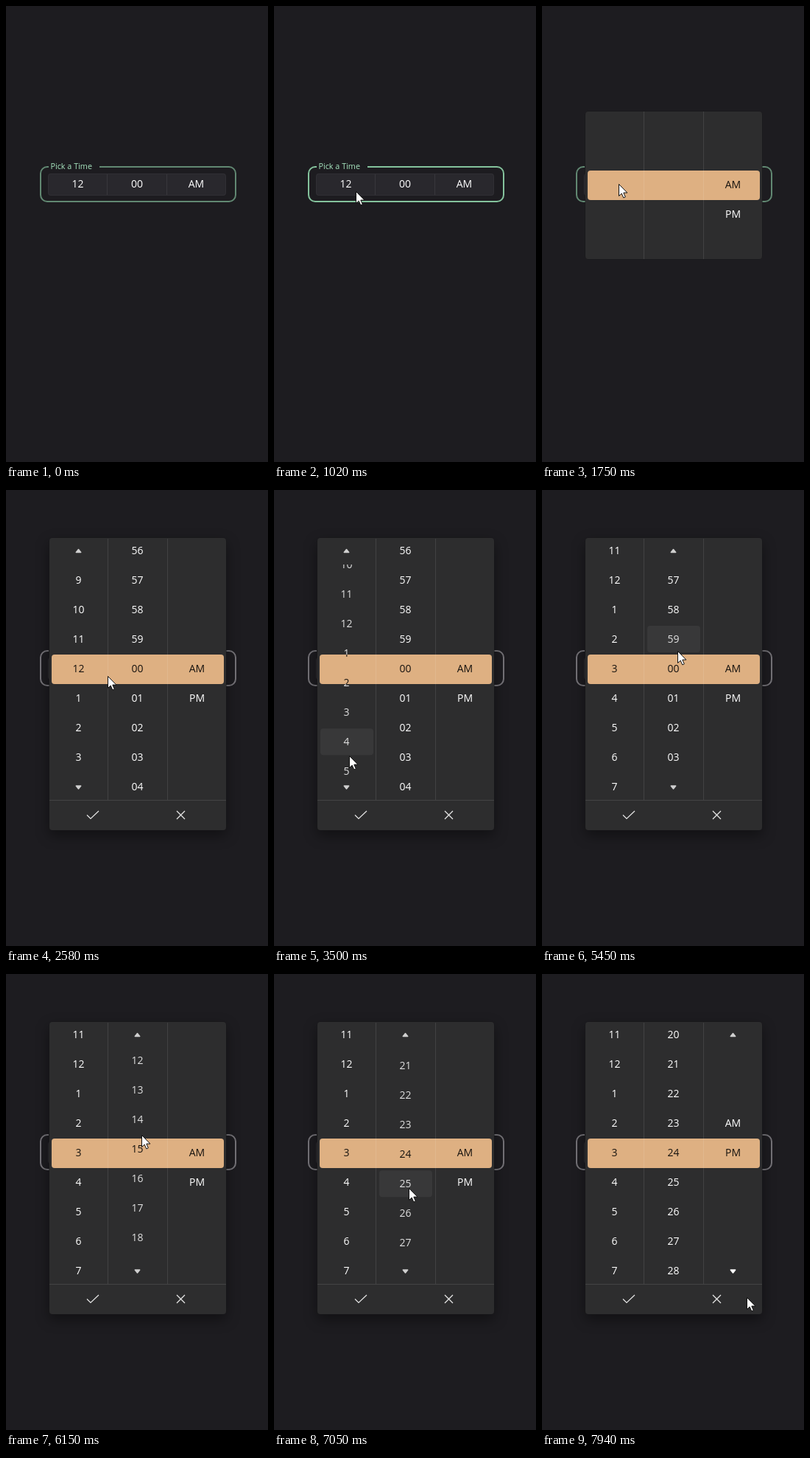
Animation, 356 px wide and 618 px high, one loop 8000 ms. Source, as an HTML page with a canvas:

```html
<!DOCTYPE html>
<html lang="en">
<head>
<meta charset="utf-8">
<title>Time picker</title>
<style>
html, body { margin: 0; width: 100%; height: 100%; overflow: hidden; background: #1d1c20; }
canvas { display: block; }
</style>
</head>
<body>
<canvas id="stage" width="356" height="618"></canvas>
<script>
const ctx = document.getElementById('stage').getContext('2d');
const LOOP = 8000, MID = 242, ROW = 40;
const FONT = '"Open Sans", "Noto Sans", sans-serif';

// Pointer stops: time, x, y
const path = [
  [360, 306, 618], [530, 238, 490], [720, 165, 348], [900, 122, 268], [1090, 104, 241],
  [2340, 104, 241], [2580, 138, 252], [2640, 138, 252], [2780, 183, 292], [3070, 102, 360],
  [3560, 102, 360], [4030, 171, 334], [4170, 171, 327], [4430, 171, 327],
  [4610, 213, 160], [4840, 184, 218], [6300, 184, 218], [6850, 183, 290], [7110, 183, 290],
  [7250, 284, 288], [7320, 254, 282], [7680, 254, 282], [7930, 278, 438]
];
const clicks = [[1290, 1420], [3230, 3360], [4230, 4430], [7520, 7650]];

const clamp = v => Math.min(1, Math.max(0, v));
const span = (t, a, b) => clamp((t - a) / (b - a));
const easeOut = u => 1 - (1 - u) ** 2;
const smooth = u => u * u * (3 - 2 * u);
const mod = (a, n) => ((a % n) + n) % n;
const mix = (a, b, u) => `rgb(${a.map((v, i) => v + (b[i] - v) * u)})`;

const columns = [
  { x: 98.5, left: 59, label: i => String(mod(i, 12) || 12) },
  { x: 178.5, left: 139, label: i => String(mod(i, 60)).padStart(2, '0') },
  { x: 259.5, left: 220, label: i => ['AM', 'PM'][i] || '' }
];

function pointerAt(t) {
  if (t < path[0][0]) return null;
  const k = path.findIndex(p => p[0] > t);
  if (k < 0) return path[path.length - 1].slice(1);
  const [t0, x0, y0] = path[k - 1], [t1, x1, y1] = path[k];
  const u = span(t, t0, t1);
  return [x0 + (x1 - x0) * u, y0 + (y1 - y0) * u];
}

function box(x, y, w, h, r, color) {
  ctx.fillStyle = color;
  ctx.beginPath();
  ctx.roundRect(x, y, w, h, r);
  ctx.fill();
}

function line(points, color, width = 1) {
  ctx.strokeStyle = color;
  ctx.lineWidth = width;
  ctx.beginPath();
  points.forEach(([x, y], i) => i ? ctx.lineTo(x, y) : ctx.moveTo(x, y));
  ctx.stroke();
}

function text(s, x, y, color, size = 14, align = 'center') {
  ctx.font = `${size}px ${FONT}`;
  ctx.textAlign = align;
  ctx.fillStyle = color;
  ctx.fillText(s, x, y);
}

function clipped(x, y, w, h, draw) {
  ctx.save();
  ctx.beginPath();
  ctx.rect(x, y, w, h);
  ctx.clip();
  draw();
  ctx.restore();
}

function borderColor(t) {
  const dim = [97, 136, 114], lit = [132, 194, 156], gray = [117, 115, 120];
  if (t < 130) return mix(dim, dim, 0);
  if (t < 1750) return mix(lit, lit, 0);
  return mix(dim, gray, span(t, 1810, 2030));
}

function drawField(t) {
  ctx.strokeStyle = borderColor(t);
  ctx.lineWidth = 2;
  ctx.beginPath();
  ctx.moveTo(127, 218);
  ctx.arcTo(312, 218, 312, 265, 9);
  ctx.arcTo(312, 265, 47, 265, 9);
  ctx.arcTo(47, 265, 47, 218, 9);
  ctx.arcTo(47, 218, 57, 218, 9);
  ctx.lineTo(58, 218);
  ctx.stroke();
  text('Pick a Time', 60.5, 221, '#a9e8c1', 10.8, 'left');
  box(57, 227, 242, 30, 4, '#302f34');
  box(58, 228, 240, 28, 3, '#29282d');
  for (const x of [137.5, 218.5]) line([[x, 228], [x, 256]], '#38373c');
  ['12', '00', 'AM'].forEach((s, i) => text(s, [97.5, 178, 258.5][i], 246, '#fff'));
}

function arrow(x, y, dir, color) {
  ctx.fillStyle = ctx.strokeStyle = color;
  ctx.lineWidth = 1.5;
  ctx.lineJoin = 'round';
  ctx.beginPath();
  ctx.moveTo(x - 3.2, y + 2 * dir);
  ctx.lineTo(x, y - 2 * dir);
  ctx.lineTo(x + 3.2, y + 2 * dir);
  ctx.closePath();
  ctx.fill();
  ctx.stroke();
}

function drawPopup(t, pointer, pressed) {
  const step = Math.min(4, Math.floor((t - 1750) / 70));
  const half = [100, 165, 195, 211, 218][step];
  const top = Math.max(65, 243 - half), bottom = Math.min(461, 243 + half);
  const [px, py] = pointer;
  const active = t < 2370 ? -1 : px < 139 ? 0 : px < 220 ? 1 : 2;
  const pos = [
    3 * smooth(span(t, 3360, 3640)),
    24 * easeOut(span(t, 5520, 7130)),
    easeOut(span(t, 7620, 7820))
  ];

  ctx.save();
  if (step > 1) {
    ctx.shadowColor = 'rgba(0,0,0,.4)';
    ctx.shadowBlur = 18;
    ctx.shadowOffsetY = 7;
  }
  box(58.5, top - .5, 241, bottom - top + 1, 5, '#18181a');
  ctx.restore();
  box(59, top, 240, bottom - top, 4, '#2d2d2e');

  // Rows are drawn twice: light everywhere, dark inside the selected band.
  const rows = dark => columns.forEach((col, c) => {
    if (step < 1 && c < 2) return;
    const p = pos[c], hasArrows = c === active;
    const y0 = hasArrows ? 101 : 66, y1 = hasArrows ? 386 : 420;
    const over = hasArrows && py > y0 && py < y1 ? Math.round(p + (py - MID) / ROW) : NaN;
    const moving = p % 1 !== 0;
    const from = dark ? 223 : y0, to = dark ? 263 : y1;
    clipped(col.left, from, 80, to - from, () => {
      for (let i = Math.floor(p) - 5; i <= p + 5; i++) {
        const s = col.label(i), y = MID + ROW * (i - p);
        const hovered = s && i === over && i !== Math.round(p);
        if (hovered && !dark) box(col.left + 4, y - 18, 72, 36, 4, pressed ? '#333334' : '#383839');
        const alpha = hovered ? (pressed ? .6 : .85) : moving ? .85 : 1;
        text(s, col.x, y + 5, dark ? '#17130f' : `rgba(255,255,255,${alpha})`);
      }
    });
  });

  clipped(59, top, 240, bottom - top, () => {
    rows(false);
    box(62, 223, 234, 40, 4, '#deb082');
    rows(true);
    for (const x of [138.5, 219.5]) line([[x, 66], [x, 420]], 'rgba(255,255,255,.1)');
    line([[59, 420.5], [299, 420.5]], '#434344');
    line([[110, 440.5], [115, 445.5], [126, 435]], '#e6e6e6', 1.2);
    line([[232, 435], [243, 446]], '#e6e6e6', 1.2);
    line([[243, 435], [232, 446]], '#e6e6e6', 1.2);
    if (active >= 0) {
      const x = columns[active].x;
      arrow(x, 82.5, 1, '#cfcfcf');
      arrow(x, 403, -1, py > 386 ? '#fff' : '#cfcfcf');
    }
  });
}

function drawPointer([x, y], pressed) {
  ctx.save();
  ctx.translate(Math.round(x) + .5, Math.round(y) + .5);
  const shape = new Path2D('M0 0V16L3.7 12.6L6.3 18.4L8.8 17.3L6.3 11.6H11.4Z');
  ctx.fillStyle = '#fff';
  ctx.strokeStyle = '#111';
  ctx.lineWidth = 1;
  ctx.lineJoin = 'miter';
  ctx.fill(shape);
  ctx.stroke(shape);
  ctx.restore();
  if (!pressed) return;
  ctx.fillStyle = 'rgba(228,222,10,.6)';
  ctx.beginPath();
  ctx.arc(x, y, 12, 0, 7);
  ctx.fill();
}

function frame() {
  const t = performance.now() % LOOP;
  const pointer = pointerAt(t);
  const pressed = clicks.some(([a, b]) => t >= a && t < b);
  ctx.fillStyle = '#1d1c20';
  ctx.fillRect(0, 0, 356, 618);
  drawField(t);
  if (t >= 1750) drawPopup(t, pointer, pressed);
  if (pointer) drawPointer(pointer, pressed);
  requestAnimationFrame(frame);
}
frame();
</script>
</body>
</html>
```
